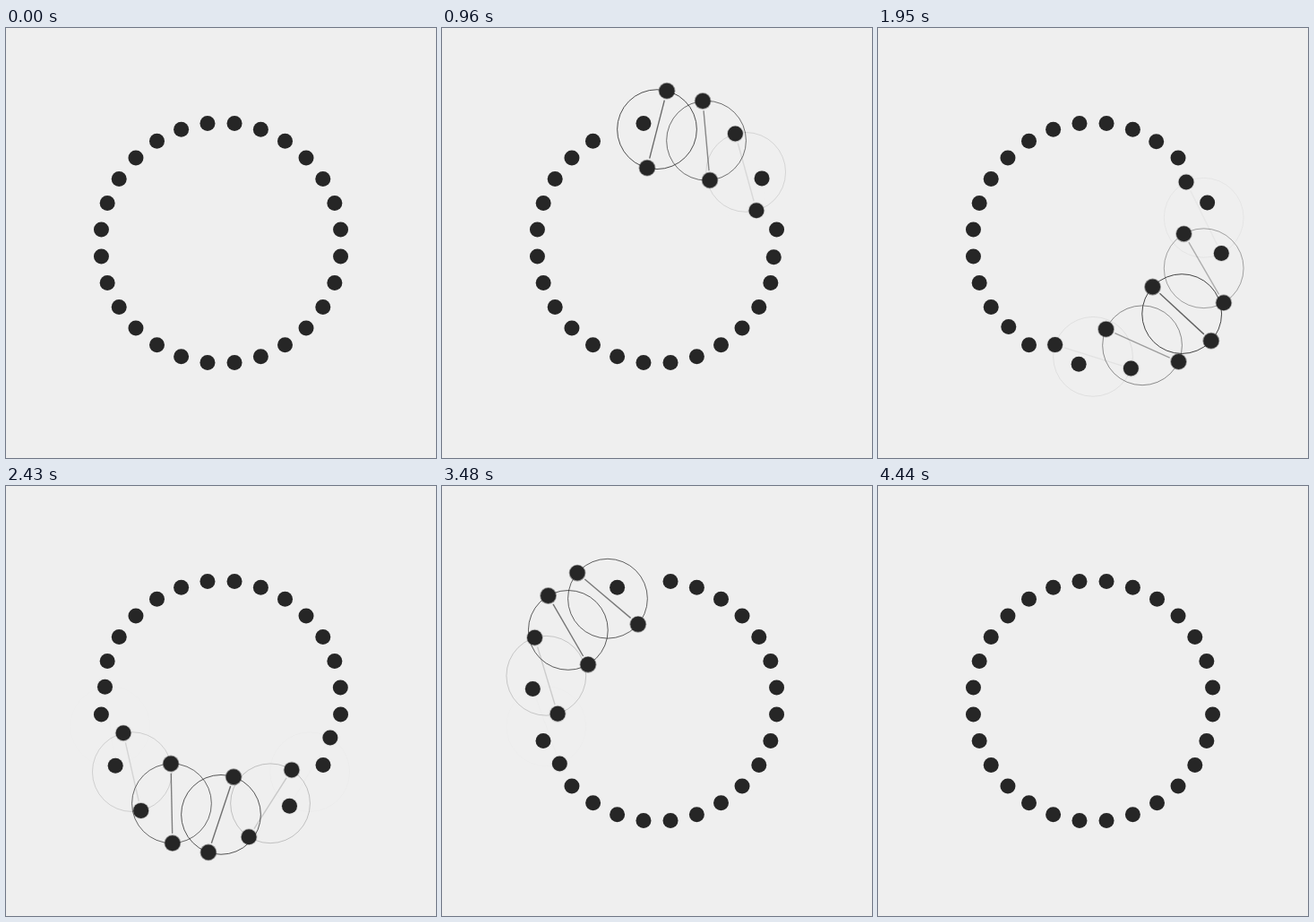
Recreate the animation shown at these times as an HTML page. Size 480 by 480 pixels, loop 5.17 s.

```html
<!DOCTYPE html>
<html lang="en">
<head>
<meta charset="utf-8">
<title>Dot ring</title>
<style>
  html, body { margin: 0; width: 100%; height: 100%; overflow: hidden; background: #efefef; }
  svg { display: block; width: 100%; height: 100%; }
</style>
</head>
<body>
<svg id="stage" viewBox="0 0 480 480">
  <g id="lines" fill="none" stroke="#262626"></g>
  <g id="dots" fill="#262626"></g>
</svg>
<script>
const LOOP = 5170, STEP = 30;
const START = 85, TURN = 1620, STAGGER = 207.3;
const PAIRS = 14, MID = 240, RING = 134.4, DOT = 8.5;

// Each wheel carries two dots that sit three places apart on the ring.
const half = 1.5 * Math.PI / PAIRS;
const hub = RING * Math.cos(half);
const radius = RING * Math.sin(half);
const spoke = radius - 10.8;

const lines = document.getElementById('lines');
const dots = document.getElementById('dots');

function set(el, attrs) {
  for (const name in attrs) el.setAttribute(name, attrs[name]);
  return el;
}

function add(parent, tag, attrs) {
  const el = document.createElementNS('http://www.w3.org/2000/svg', tag);
  return parent.appendChild(set(el, attrs));
}

const wheels = Array.from({ length: PAIRS }, (_, i) => {
  const angle = i * 2 * Math.PI / PAIRS;
  const cx = MID + hub * Math.sin(angle);
  const cy = MID - hub * Math.cos(angle);
  const disc = () => ({
    halo: add(dots, 'circle', { r: DOT + 0.9 }),
    core: add(dots, 'circle', { r: DOT })
  });
  return {
    angle, cx, cy,
    delay: START + i * STAGGER,
    rim: add(lines, 'circle', { cx, cy, r: radius, 'stroke-width': 1 }),
    bar: add(lines, 'line', { 'stroke-width': 1.4 }),
    ends: [disc(), disc()]
  };
});

const clamp = v => Math.min(1, Math.max(0, v));
const ease = u => u - Math.sin(2 * Math.PI * u) / (2 * Math.PI);

function draw(time) {
  for (const w of wheels) {
    const p = ease(clamp((time - w.delay) / TURN));
    const a = w.angle + Math.PI * (1 + p);
    const dx = Math.cos(a), dy = Math.sin(a);
    const glow = Math.sin(Math.PI * p) ** 2;

    set(w.rim, { opacity: 0.85 * glow });
    set(w.bar, {
      x1: w.cx - spoke * dx, y1: w.cy - spoke * dy,
      x2: w.cx + spoke * dx, y2: w.cy + spoke * dy,
      opacity: 0.7 * glow
    });
    w.ends.forEach((end, i) => {
      const r = i ? -radius : radius;
      const at = { cx: w.cx + r * dx, cy: w.cy + r * dy };
      set(end.core, at);
      set(end.halo, { ...at, opacity: 0.5 * Math.sqrt(glow) });
    });
  }
}

const begin = performance.now();
function frame() {
  const t = (performance.now() - begin) % LOOP;
  draw(Math.floor(t / STEP) * STEP);
  requestAnimationFrame(frame);
}
frame();
</script>
</body>
</html>
```
